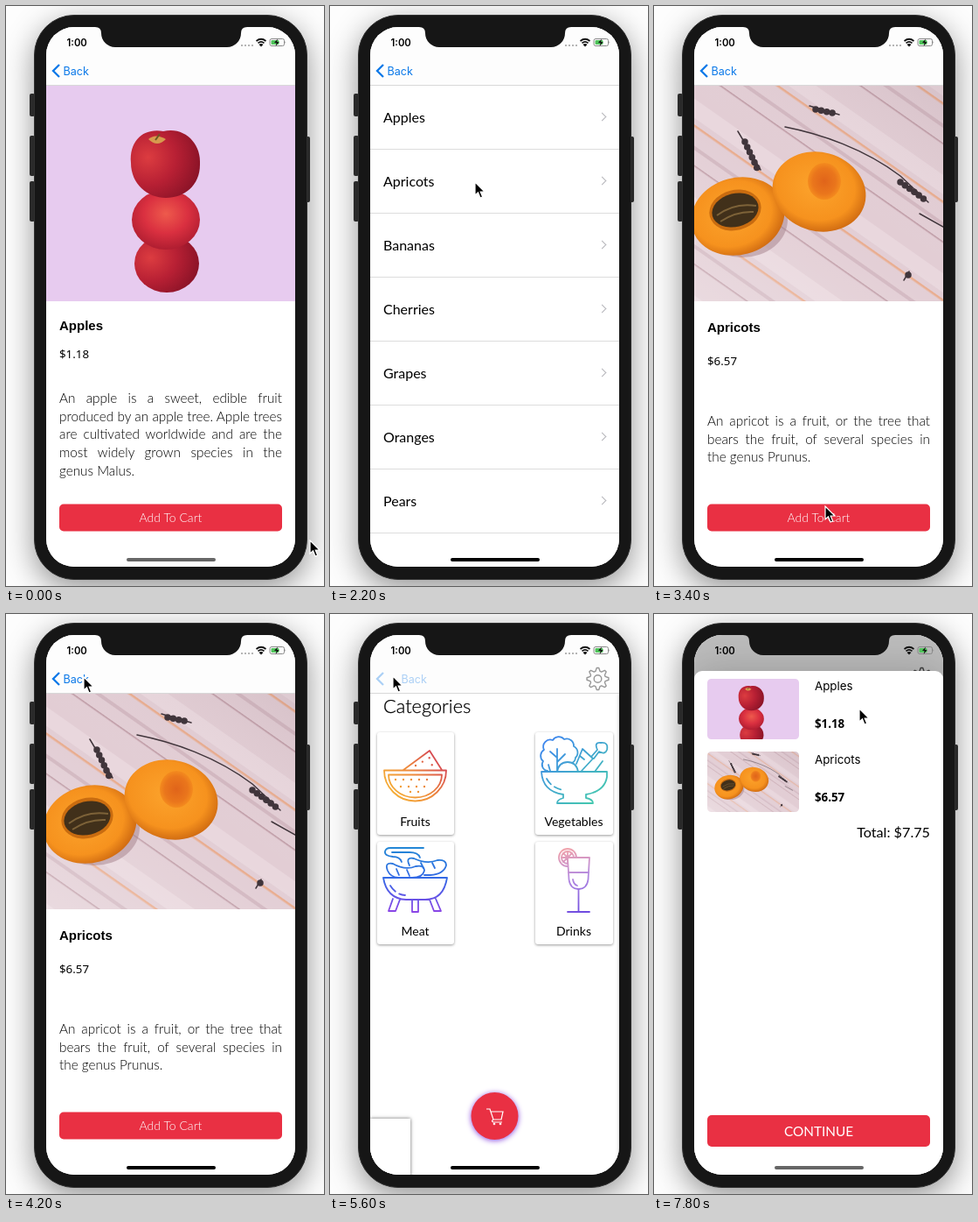
Recreate the animation shown at these times as an HTML page. Size 364 by 662 pixels, loop 8 s.

```html
<!DOCTYPE html>
<html lang="en">
<head>
<meta charset="utf-8">
<title>Grocery app</title>
<style>
  html, body { margin: 0; width: 100%; height: 100%; overflow: hidden; background: #fdfdfd; }
  #stage { position: relative; width: 364px; height: 662px; overflow: hidden; font-family: Lato, sans-serif; color: #000; }
  #stage div, #stage svg, #stage p, #stage ul { position: absolute; margin: 0; padding: 0; }
  svg { display: block; }
  .full { left: 0; top: 0; width: 364px; height: 662px; }

  .phone { left: 32px; top: 10px; width: 313px; height: 645px; box-sizing: border-box; border-radius: 46px;
    background: #161616; border: 1.5px solid #303030; box-shadow: 0 10px 34px rgba(0, 0, 0, .42); }
  .key { width: 6px; background: #333; border-radius: 2px; }
  #screen { background: #fff; clip-path: inset(24px 33px 22px 46px round 32px); }

  .page { left: 46px; top: 91px; width: 285px; height: 549px; background: #fff; }
  .page > svg { left: 0; top: 0; width: 285px; height: 549px; }
  .header { left: 46px; top: 24px; width: 285px; height: 66px; background: #fdfdfd; border-bottom: 1px solid #d8d8d8; }
  .body { left: 15px; width: 255px; font-weight: 300; font-size: 15.3px; line-height: 20.7px; white-space: nowrap; }
  .body span { display: block; text-align: justify; text-align-last: justify; }
  .body span:last-child { text-align-last: left; }

  ul { list-style: none; left: 0; top: 0; width: 285px; }
  li { position: relative; height: 73px; box-sizing: border-box; padding-left: 15px; font-size: 16px; line-height: 72px;
    border-bottom: 1px solid #ddd; }
  li::after { content: ""; position: absolute; left: 262px; top: 32px; width: 6px; height: 6px;
    border: solid #b5b5ba; border-width: 1.5px 1.5px 0 0; transform: rotate(45deg); }

  .dim { background: #000; opacity: 0; }
  .sheet { left: 46px; top: 0; width: 285px; height: 640px; background: #fff; border-radius: 9px 9px 0 0;
    box-shadow: 0 0 45px rgba(0, 0, 0, .2); }
  .sheet > svg { left: 0; top: 0; }
  .corner { left: 46px; top: 576px; width: 46px; height: 70px; background: #fff; box-shadow: 0 0 4px rgba(0, 0, 0, .6); }
  .home { left: 138px; top: 630px; width: 102px; height: 4px; border-radius: 2px; background: #666; }

  .title { font: bold 15px "Liberation Sans", Arial, sans-serif; }
  .price { font: 13.3px "Noto Sans", sans-serif; }
  .bold { font: bold 13.3px "Open Sans", sans-serif; }
  .item { font: 13.3px Inter, sans-serif; }
  .add { font-size: 14px; fill: #fff; text-anchor: middle; }
  .label { font-size: 14px; text-anchor: middle; }
  .card { fill: #fff; filter: drop-shadow(0 1px 1.5px rgba(0, 0, 0, .4)); }
  .icon { fill: none; stroke-width: 1.8; stroke-linecap: round; stroke-linejoin: round; }
  .dots { stroke-width: 2.4; stroke-dasharray: 0 9; }

  /* 2.5% of the loop is one 200 ms tick */
  .anim { animation: 8s step-end infinite; }
  #apples { animation-name: apples; }
  #apricots { animation-name: apricots; }
  #list { animation-name: list; }
  #cats { animation-name: cats; }
  #back { animation-name: back; }
  #backLabel { animation-name: backLabel; }
  #gear { animation-name: gear; }
  #row { animation-name: row; }
  #add1 { animation-name: add1; }
  #add2 { animation-name: add2; }
  #fab { animation-name: fab; }
  .corner { animation-name: corner; }
  .dim { animation-name: dim; }
  .sheet { animation-name: sheet; }
  .home { animation-name: home; }
  #cursor { left: 0; top: 0; animation: cursor 8s infinite; }

  @keyframes apples { 0% { transform: none } 20% { transform: translateX(150px) } 22.5% { transform: translateX(266px) }
    25%, 100% { transform: translateX(285px) } }
  @keyframes apricots { 0% { transform: translateX(285px) } 32.5% { transform: translateX(150px) } 35% { transform: translateX(19px) }
    37.5% { transform: none } 57.5% { transform: translateX(150px) } 60% { transform: translateX(266px) }
    62.5%, 100% { transform: translateX(285px) } }
  @keyframes list { 0% { transform: translateX(-285px) } 20% { transform: translateX(-135px) } 22.5% { transform: translateX(-19px) }
    25% { transform: none } 32.5% { transform: translateX(-135px) } 35% { transform: translateX(-266px) }
    37.5% { transform: translateX(-285px) } 57.5% { transform: translateX(-135px) } 60% { transform: translateX(-19px) }
    62.5% { transform: none } 67.5% { transform: translateX(46px) } 70%, 100% { transform: translateX(285px) } }
  @keyframes cats { 0% { transform: translateX(-285px) } 67.5% { transform: translateX(-239px) } 70%, 100% { transform: none } }
  @keyframes back { 0% { opacity: 1 } 17.5% { opacity: .22 } 20% { opacity: .5 } 22.5% { opacity: 1 } 55% { opacity: .22 }
    57.5% { opacity: .5 } 60% { opacity: 1 } 65% { opacity: .22 } 67.5% { opacity: .6 } 70% { opacity: .33 } 72.5%, 100% { opacity: 0 } }
  @keyframes backLabel { 0% { transform: none } 67.5% { transform: translateX(4px) } 70%, 100% { transform: translateX(16px) } }
  @keyframes gear { 0% { opacity: 0 } 67.5% { opacity: .2 } 70% { opacity: .6 } 72.5%, 100% { opacity: 1 } }
  @keyframes row { 0% { background: transparent } 30% { background: #c9c8cd } 37.5%, 100% { background: transparent } }
  @keyframes add1 { 0% { opacity: 1 } 10% { opacity: .3 } 12.5%, 100% { opacity: 1 } }
  @keyframes add2 { 0% { opacity: 1 } 40% { opacity: .3 } 42.5%, 100% { opacity: 1 } }
  @keyframes fab { 0% { opacity: 1 } 82.5% { opacity: .3 } 85%, 100% { opacity: 1 } }
  @keyframes corner { 0% { opacity: 0 } 70% { opacity: 1 } 72.5%, 100% { opacity: 0 } }
  @keyframes dim { 0% { opacity: 0 } 87.5% { opacity: .08 } 90% { opacity: .18 } 92.5% { opacity: .23 } 95% { opacity: .25 }
    97.5%, 100% { opacity: .26 } }
  @keyframes sheet { 0% { transform: translateY(700px) } 87.5% { transform: translateY(430px) } 90% { transform: translateY(213px) }
    92.5% { transform: translateY(115px) } 95% { transform: translateY(78px) } 97.5%, 100% { transform: translateY(65px) } }
  @keyframes home { 0% { background: #666 } 22.5% { background: #000 } 87.5%, 100% { background: #666 } }
  @keyframes cursor {
    0% { transform: translate(347px, 609px); animation-timing-function: steps(3) }
    7.5% { transform: translate(205px, 580px); animation-timing-function: steps(2) }
    12.5% { transform: translate(190px, 560px); animation-timing-function: steps(2) }
    17.5% { transform: translate(79px, 75px); animation-timing-function: steps(4) }
    27.5% { transform: translate(165px, 200px); animation-timing-function: steps(2) }
    32.5% { transform: translate(175px, 225px); animation-timing-function: step-end }
    35% { transform: translate(208px, 458px); animation-timing-function: step-end }
    37.5% { transform: translate(200px, 575px); animation-timing-function: steps(2) }
    42.5% { transform: translate(195px, 570px); animation-timing-function: steps(3) }
    50% { transform: translate(95px, 90px); animation-timing-function: step-end }
    52.5% { transform: translate(88px, 71px); animation-timing-function: steps(7) }
    70% { transform: translate(71px, 70px); animation-timing-function: steps(4) }
    80% { transform: translate(189px, 570px); animation-timing-function: steps(4) }
    90% { transform: translate(191px, 568px); animation-timing-function: steps(3) }
    97.5%, 100% { transform: translate(234px, 107px) }
  }
</style>
</head>
<body>
<div id="stage">
  <svg width="0" height="0">
    <defs>
      <radialGradient id="appleSkin" cx=".5" cy=".4" r=".65">
        <stop stop-color="#ee5a4c"/><stop offset=".5" stop-color="#da3040"/><stop offset="1" stop-color="#a81a2e"/>
      </radialGradient>
      <radialGradient id="darkSkin" cx=".25" cy=".4" r=".8">
        <stop stop-color="#dc3c40"/><stop offset=".5" stop-color="#b82034"/><stop offset="1" stop-color="#871226"/>
      </radialGradient>
      <radialGradient id="flesh" cx=".45" cy=".45" r=".6">
        <stop stop-color="#fca32c"/><stop offset=".7" stop-color="#f6921e"/><stop offset="1" stop-color="#c9640f"/>
      </radialGradient>
      <radialGradient id="hollow">
        <stop stop-color="#e0641a"/><stop offset=".7" stop-color="#ea761c"/><stop offset="1" stop-color="#f48b1e"/>
      </radialGradient>
      <linearGradient id="light" x1="0" y1="1" x2="1" y2="0">
        <stop stop-color="#fff" stop-opacity=".3"/><stop offset=".5" stop-color="#fff" stop-opacity="0"/>
        <stop offset="1" stop-color="#604450" stop-opacity=".12"/>
      </linearGradient>
      <pattern id="cloth" width="80" height="92" patternUnits="userSpaceOnUse" patternTransform="rotate(35)">
        <path fill="#e2cdd4" d="M0 0h80v92H0z"/>
        <path fill="#e9d7dd" d="M0 12h80v18H0z"/>
        <path fill="#e9ab8c" d="M0 36h80v2.500H0z"/>
        <path fill="#d2b7c0" d="M0 56h80v4H0z"/>
        <path fill="#bc98a2" d="M0 74h80v1.500H0z"/>
      </pattern>
      <g id="applePic">
        <path fill="#e7cbef" d="M0 0h285v246H0z"/>
        <ellipse cx="138" cy="203" rx="37" ry="33" fill="url(#darkSkin)"/>
        <ellipse cx="137" cy="153" rx="39" ry="34" fill="url(#appleSkin)"/>
        <path fill="url(#darkSkin)" d="M97 88C95 62 112 48 134 52C158 46 178 66 176 90C176 114 158 128 137 128S97 112 97 88Z"/>
        <path fill="#d79a4e" d="M117 61q8-7 20 0q-10 10-20 0Z"/>
        <path fill="none" stroke="#6b5a23" stroke-width="2" d="M125 62l5-7"/>
      </g>
      <g id="apricotPic">
        <path fill="url(#cloth)" d="M-40 0h370v250H-40z"/>
        <path fill="url(#light)" d="M-40 0h370v250H-40z"/>
        <g fill="none" stroke="#40353b" stroke-linecap="round">
          <path stroke-width="1.500" d="M104 47C145 55 195 72 236 103L268 133M258 146l27 15M50 52l26 44M132 23l34 10M246 212l-6 10"/>
          <path stroke-width="7.500" stroke-dasharray="0 6.500" d="M58 64l14 30M139 27l24 5M236 110l28 20M245 216l-2 5"/>
        </g>
        <ellipse cx="55" cy="153" rx="52" ry="43" fill="#a3808a" opacity=".5"/>
        <ellipse cx="50" cy="149" rx="54" ry="44" fill="url(#flesh)" transform="rotate(-15 50 149)"/>
        <ellipse cx="47" cy="142" rx="30" ry="23" fill="#c96c10" transform="rotate(-14 47 142)"/>
        <ellipse cx="47" cy="142" rx="27" ry="19" fill="#41301a" transform="rotate(-14 47 142)"/>
        <path fill="none" stroke="#7d6238" stroke-width="2" d="M26 148q20-15 45-11M30 155q18-12 38-11"/>
        <ellipse cx="143" cy="121" rx="54" ry="45" fill="url(#flesh)" transform="rotate(15 143 121)"/>
        <ellipse cx="149" cy="109" rx="19" ry="21" fill="url(#hollow)"/>
      </g>
      <g id="addButton">
        <rect x="61" y="568.500" width="255" height="31" rx="5" fill="#e93043"/>
        <text class="add" x="188.500" y="589" font-weight="300">Add To Cart</text>
      </g>
      <linearGradient id="warm" gradientUnits="userSpaceOnUse" x1="65" y1="212" x2="128" y2="156">
        <stop stop-color="#f7b733"/><stop offset=".5" stop-color="#ee8a3c"/><stop offset="1" stop-color="#cf3558"/>
      </linearGradient>
      <linearGradient id="fresh" gradientUnits="userSpaceOnUse" x1="248" y1="143" x2="306" y2="214">
        <stop stop-color="#3d85ee"/><stop offset="1" stop-color="#45c9ae"/>
      </linearGradient>
      <linearGradient id="smoky" gradientUnits="userSpaceOnUse" x1="98" y1="267" x2="98" y2="340">
        <stop stop-color="#2387d6"/><stop offset=".5" stop-color="#3567e6"/><stop offset="1" stop-color="#8b45e6"/>
      </linearGradient>
      <linearGradient id="cool" gradientUnits="userSpaceOnUse" x1="272" y1="268" x2="290" y2="340">
        <stop stop-color="#f0a3ac"/><stop offset=".45" stop-color="#b58be0"/><stop offset="1" stop-color="#6f4be0"/>
      </linearGradient>
    </defs>
  </svg>

  <div class="key" style="left:27px;top:100px;height:26px"></div>
  <div class="key" style="left:27px;top:148px;height:46px"></div>
  <div class="key" style="left:27px;top:200px;height:46px"></div>
  <div class="key" style="left:342px;top:149px;height:75px"></div>
  <div class="phone"></div>

  <div id="screen" class="full">
    <div id="cats" class="page anim">
      <svg viewBox="46 91 285 549">
        <text x="61" y="112.500" font-size="21.800" font-weight="300" stroke="#000" stroke-width=".25">Categories</text>
        <rect class="card" x="54" y="135" width="88" height="117" rx="3"/>
        <rect class="card" x="235" y="135" width="89" height="117" rx="3"/>
        <rect class="card" x="54" y="260" width="88" height="117" rx="3"/>
        <rect class="card" x="235" y="260" width="89" height="117" rx="3"/>
        <text class="label" x="97.500" y="242">Fruits</text>
        <text class="label" x="279" y="242">Vegetables</text>
        <text class="label" x="97.500" y="367">Meat</text>
        <text class="label" x="279" y="367">Drinks</text>
        <g class="icon" stroke="url(#warm)">
          <path d="M62 178.500H133A35.500 35 0 0 1 62 178.500ZM67 183.500H128A30.500 26 0 0 1 67 183.500ZM84 178L114 156L128 178"/>
          <path class="dots" d="M98 173l16-9l3 9M75 189h44M81 197h34M92 203h12"/>
        </g>
        <g class="icon" stroke="url(#fresh)">
          <path d="M242 180H317V186C315 198 305 204 293 206V210C299 211 301 214 301 216H260C260 213 263 211 267 210V206C253 204 243 197 242 180Z"/>
          <path d="M249 179a7 7 0 0 1-5-11a8 8 0 0 1 1-13a8 8 0 0 1 10-11a8 8 0 0 1 13-1a8 8 0 0 1 11 8a8 8 0 0 1 2 13a7 7 0 0 1-4 6"/>
          <path d="M260 179V154M260 164l-8-7M260 169l9-9M252 179l-2-7M260 180q2-11 12-11t12 11"/>
          <path d="M282 171l7-17l12 11l-13 14M286 162l5 4M299 163l7-8q-4-9 4-8q9-1 7 8q-2 6-9 2l-6 8M303 180l9-12"/>
          <path stroke-dasharray="8 5" d="M248 188q6 11 20 13"/>
        </g>
        <g class="icon" stroke="url(#smoky)">
          <path d="M61 301H134Q130 326 109 326H87Q65 325 61 301ZM72 325l-5 14h8l5-13M94 326v14h7v-14M121 325l6 14h-8l-5-13"/>
          <path d="M66 293q-4-10 6-8q14 8 26 3q10-2 10 5q-2 8-14 8H78q-9-1-12-8ZM91 287q-5-10 5-8q15 7 27 2q10-1 10 6q-3 10-18 11h-7"/>
          <path d="M82 283q-2-6-10-6q-10-1-9-6q1-4 6-4h38M71 272h20q10 0 12 6M76 291l3 7M88 292l3 7M104 284l3 6M117 284l3 6"/>
          <path stroke-dasharray="9 5" d="M69 310q6 10 17 11"/>
        </g>
        <g class="icon" stroke="url(#cool)" stroke-width="1.500">
          <circle cx="272" cy="278" r="10"/><circle cx="272" cy="278" r="7"/>
          <path d="M272 271v14M265 278h14M267 273l10 10M267 283l10-10"/>
          <path fill="#fff" d="M272 278H297L295.500 303Q294 314 284.500 314T273.500 303Z"/>
          <path d="M273 295H296M284.500 314V340M272 340H297M278 303q1 6 5 7"/>
        </g>
        <g id="fab" class="anim">
          <circle cx="188.500" cy="573" r="27" fill="#e93043" style="filter:drop-shadow(0 1px 3px #8a4be0)"/>
          <path fill="none" stroke="#fff" stroke-width="1.200" d="M179 565h4l4 12h9l2-9H184M187 577q-3 2 0 3h10"/>
          <circle cx="188" cy="582" r="1.300" fill="#fff"/><circle cx="195" cy="582" r="1.300" fill="#fff"/>
        </g>
      </svg>
    </div>

    <div id="list" class="page anim" style="box-shadow:0 0 4px rgba(0,0,0,.25)">
      <ul><li>Apples</li><li id="row" class="anim">Apricots</li><li>Bananas</li><li>Cherries</li><li>Grapes</li><li>Oranges</li><li>Pears</li></ul>
    </div>

    <div id="apples" class="page anim">
      <svg viewBox="46 91 285 549">
        <use href="#applePic" x="46" y="91"/>
        <text class="title" x="61" y="370">Apples</text>
        <text class="price" x="61" y="402">$1.18</text>
        <g id="add1" class="anim"><use href="#addButton"/></g>
      </svg>
      <p class="body" style="top:346px"><span>An apple is a sweet, edible fruit</span><span>produced by an apple tree. Apple trees</span><span>are cultivated worldwide and are the</span><span>most widely grown species in the</span><span>genus Malus.</span></p>
    </div>

    <div id="apricots" class="page anim">
      <svg viewBox="46 91 285 549">
        <svg x="46" y="91" width="285" height="246" viewBox="0 0 285 246"><use href="#apricotPic"/></svg>
        <text class="title" x="61" y="372">Apricots</text>
        <text class="price" x="61" y="410">$6.57</text>
        <g id="add2" class="anim"><use href="#addButton"/></g>
      </svg>
      <p class="body" style="top:372px"><span>An apricot is a fruit, or the tree that</span><span>bears the fruit, of several species in</span><span>the genus Prunus.</span></p>
    </div>

    <div class="corner anim"></div>
    <div class="header"></div>
    <svg class="full" viewBox="0 0 364 662">
      <g id="back" class="anim" fill="#0a78e8">
        <path fill="none" stroke="#0a78e8" stroke-width="2.300" d="M61 67l-7 7l7 7"/>
        <text id="backLabel" class="anim" x="65.500" y="79" font-family="Inter, sans-serif" font-size="12.600">Back</text>
      </g>
      <g id="gear" class="anim" fill="none" stroke="#555" stroke-width="1.400">
        <circle cx="306.500" cy="74" r="4.300"/>
        <path id="cog" stroke-linejoin="round"/>
      </g>
    </svg>

    <div class="dim full anim"></div>

    <div class="sheet anim">
      <svg width="285" height="640">
        <svg x="15" y="9" width="105" height="69" viewBox="0 29.400 285 187.300"><use href="#applePic"/></svg>
        <svg x="15" y="92" width="105" height="69" viewBox="-30 18 339 223"><use href="#apricotPic"/></svg>
        <g fill="none" stroke="#fff" stroke-width="3">
          <rect x="13.500" y="7.500" width="108" height="72" rx="6"/><rect x="13.500" y="90.500" width="108" height="72" rx="6"/>
        </g>
        <text class="item" x="138" y="22">Apples</text>
        <text class="bold" x="138" y="65">$1.18</text>
        <text class="item" x="138" y="106">Apricots</text>
        <text class="bold" x="138" y="149">$6.57</text>
        <text x="270" y="189.500" font-size="16.200" text-anchor="end">Total: $7.75</text>
        <rect x="15" y="507" width="255" height="36" rx="5" fill="#e93043"/>
        <text class="add" x="142.500" y="530.500" style="font-size:15.3px">CONTINUE</text>
      </svg>
    </div>

    <div class="home anim"></div>
    <svg class="full" viewBox="0 0 364 662">
      <path fill="#161616" d="M102 23h174v1q-7 0-7 7a16 16 0 0 1-16 16H125a16 16 0 0 1-16-16q0-7-7-7z"/>
      <text x="69.500" y="46" font-family="Inter, sans-serif" font-size="11.300" font-weight="600">1:00</text>
      <path stroke="#b5b5b5" stroke-width="2" stroke-dasharray="2 2" d="M269 45h14"/>
      <g fill="none" stroke="#111" stroke-width="1.700">
        <path d="M286.500 40q5.500-4.500 11 0M288.500 42.400q3.500-3 7 0"/>
        <path fill="#111" stroke="none" d="M289.500 44q2.500-2 5 0L292 46.500z"/>
      </g>
      <rect x="302" y="37.500" width="16.500" height="8" rx="2" fill="none" stroke="#888"/>
      <rect x="303.500" y="39" width="9" height="5" rx="1" fill="#4fc35a"/>
      <path fill="#111" d="M311 37.500l-4 4.500h2.600l-1 4l4-5h-2.600z"/>
      <path fill="#888" d="M319.500 40q1.500 1.500 0 3z"/>
    </svg>
  </div>

  <svg id="cursor" width="14" height="22" viewBox="-1 -1 14 22">
    <path fill="#000" stroke="#fff" stroke-width="1.200" d="M0 0V15L3.500 11.800L6 18L8.700 16.900L6.200 11H11Z"/>
  </svg>
</div>
<script>
  // Eight-toothed gear outline
  const points = [];
  for (let i = 0; i < 32; i++) {
    const angle = (i - 1.5) * Math.PI / 16;
    const radius = i % 4 === 1 || i % 4 === 2 ? 12.5 : 9;
    points.push([306.5 + radius * Math.cos(angle), 74 + radius * Math.sin(angle)]);
  }
  document.getElementById('cog').setAttribute('d', 'M' + points.join('L') + 'Z');
</script>
</body>
</html>
```
